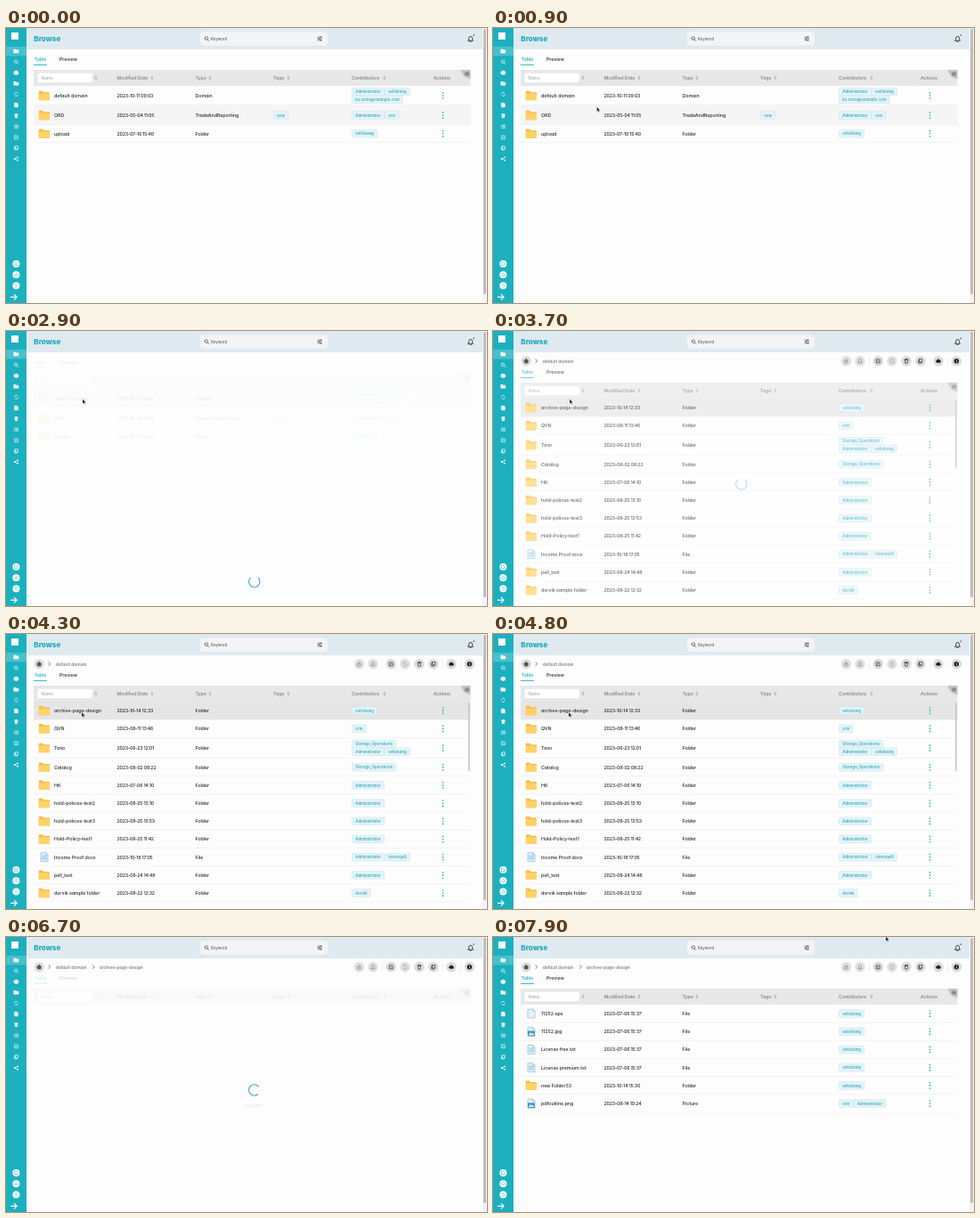
These frames come from a looping animation (540 by 309 pixels, 8 s). An HTML page:

```html
<!DOCTYPE html>
<html lang="en">
<head>
<meta charset="utf-8">
<title>Browse</title>
<style>
  html, body { margin: 0; width: 100%; height: 100%; overflow: hidden; background: #fdfdfd; }
  svg { display: block; width: 100%; height: 100%; }
  text {
    font-family: Inter, "Open Sans", sans-serif; font-feature-settings: "cv11";
    font-size: 5.3px; font-weight: 500; fill: #2b2b2b; letter-spacing: -.05px;
  }
  .date { letter-spacing: -.25px; }
  .head { font-weight: 600; fill: #8b8b8b; letter-spacing: -.1px; }
  .hint { font-size: 4.7px; fill: #aaa; }
  .chip { font-size: 4.4px; fill: #22a9ba; letter-spacing: 0; }
  .crumb { font-size: 4.9px; fill: #777; }
  .title { font-size: 8.2px; font-weight: 800; fill: #1cacbc; }
</style>
</head>
<body>
<svg id="stage" viewBox="0 0 540 309" preserveAspectRatio="none"></svg>
<script>
const LOOP = 8000, TEAL = '#1cb0bf', DARK = '#444';
const stage = document.getElementById('stage');

function add(parent, tag, attrs = {}, text) {
  const el = document.createElementNS('http://www.w3.org/2000/svg', tag);
  for (const k in attrs) el.setAttribute(k, attrs[k]);
  if (text) el.textContent = text;
  return parent.appendChild(el);
}
const group = (p, x = 0, y = 0) => add(p, 'g', { transform: `translate(${x} ${y})` });
const rect = (p, x, y, width, height, fill, more) => add(p, 'rect', { x, y, width, height, fill, ...more });
const circle = (p, cx, cy, r, fill, more) => add(p, 'circle', { cx, cy, r, fill, ...more });
const fillPath = (p, d, fill) => add(p, 'path', { d, fill });
const line = (p, d, stroke, w = .7) =>
  add(p, 'path', { d, stroke, 'stroke-width': w, fill: 'none', 'stroke-linecap': 'round', 'stroke-linejoin': 'round' });
// y is the middle of the line of text
const label = (p, x, y, text, cls = '') => add(p, 'text', { x, y: y + 1.9, class: cls }, text);
const show = (el, on) => el.setAttribute('visibility', on ? 'visible' : 'hidden');
const ramp = (t, a, b) => Math.min(1, Math.max(0, (t - a) / (b - a)));

// Small glyphs, centred on 0,0
const glyphs = {
  folder: 'M-2.5 -2H-.5L.2 -1.2H2.5V2H-2.5Z',
  search: 'M1.1 1.1L2.6 2.6M-2.2 -.4A1.8 1.8 0 1 1 1.4 -.4A1.8 1.8 0 1 1 -2.2 -.4',
  box: 'M-2.3 -1.2L0 -2.2L2.3 -1.2V1.6L0 2.3L-2.3 1.6Z',
  doc: 'M-1.8 -2.4H.8L1.9 -1.3V2.4H-1.8Z',
  bin: 'M-2 -1.6H2M-.7 -2.2H.7M-1.5 -1.2L-1.2 2.3H1.2L1.5 -1.2Z',
  list: 'M-2.3 -1.6H-2M-.9 -1.6H2.3M-2.3 0H-2M-.9 0H2.3M-2.3 1.6H-2M-.9 1.6H2.3',
  edit: 'M.6 -2H-2V2H2V-.4M-.5 .6L2.2 -2.1',
  loop: 'M-2 -.4A2 2 0 0 1 1.6 -1.4M2 .4A2 2 0 0 1 -1.6 1.4',
  share: 'M1.6 -1.7L-1.7 0L1.6 1.7',
  home: 'M-2.4 0L0 -2.2L2.4 0H1.7V2.2H-1.7V0Z',
  lock: 'M-1.6 -.2H1.6V2.2H-1.6ZM-1 -.2V-1.2A1 1 0 0 1 1 -1.2V-.2',
  bell: 'M-2.2 1.5H2.2L1.5 .5V-.6A1.5 1.6 0 0 0 -1.5 -.6V.5ZM-.5 2.3H.5',
  copy: 'M-1 -2.2H2V1.2H-1ZM-1 -1.2H-2V2.2H1V1.2',
  cloud: 'M-1.6 1.5A1.3 1.3 0 0 1 -1.5 -1A1.7 1.7 0 0 1 1.6 -.8A1.2 1.2 0 0 1 1.7 1.5Z'
};
function glyph(p, name, x, y, color, solid, size = 1) {
  const g = add(p, 'g', { transform: `translate(${x} ${y}) scale(${size})` });
  const el = line(g, glyphs[name], color, .7);
  if (solid) el.setAttribute('fill', color);
  return g;
}

function fileIcon(p, kind, y) {
  const g = group(p, 43, y);
  if (kind === 'd') {
    fillPath(g, 'M-6.2 -4.6Q-6.2 -5.3 -5.5 -5.3H-2L-.6 -3.8H5.3Q6 -3.8 6 -3.1V4.5Q6 5.2 5.3 5.2H-5.5Q-6.2 5.2 -6.2 4.5Z', '#f5bd48');
    rect(g, -6.2, -2.6, 12.2, 7.8, '#ffd265', { rx: .8 });
    return;
  }
  fillPath(g, 'M-4 -5H1.6L4 -2.6V5H-4Z', '#e5f1f8').setAttribute('stroke', '#79b4d3');
  g.firstChild.setAttribute('stroke-width', .6);
  line(g, 'M1.6 -5V-2.6H4', '#79b4d3', .5);
  if (kind === 't') line(g, 'M-2.3 -1.4H2.3M-2.3 .4H2.3M-2.3 2.2H2.3', '#5fa5ca', .6);
  if (kind === 'i') {
    rect(g, -4, -.8, 8, 5.8, '#4796bf');
    fillPath(g, 'M-3.2 4L-1 .8L.6 2.6L1.7 1.5L3.3 4Z', '#e5f1f8');
  }
}

function chips(p, x, y, names) {
  for (const name of names.split(',')) {
    const g = group(p, x, y);
    const box = rect(g, 0, -4.3, 1, 8.6, '#e6f3f7', { rx: 1.2, stroke: '#bfe2e9', 'stroke-width': .5 });
    const w = label(g, 3.8, -.3, name, 'chip').getComputedTextLength() + 7.6;
    box.setAttribute('width', w);
    x += w + .6;
  }
}

function sortMark(p, x, y) {
  fillPath(p, `M${x - 1.5} ${y - .6}h3l-1.5 -1.7zM${x - 1.5} ${y + .6}h3l-1.5 1.7z`, '#aaa');
}

// Tabs and column heads; top is the upper edge of the head bar
function tableHead(p, top) {
  const mid = top + 9, tab = top - 11.7;
  label(p, 31.5, tab, 'Table').style.fill = TEAL;
  label(p, 60, tab, 'Preview');
  rect(p, 31, tab + 5.6, 15, .9, TEAL);
  rect(p, 31, top, 490.5, 18, '#e7e7e8');
  rect(p, 35.5, top + 3.5, 61.5, 11, '#fff', { rx: 1, stroke: '#ddd', 'stroke-width': .4 });
  label(p, 39.5, mid, 'Name', 'hint');
  sortMark(p, 101, mid);
  [[124.5, 'Modified Date', 164], [212.5, 'Type', 229], [300, 'Tags', 317], [388, 'Contributors', 425], [480, 'Actions']]
    .forEach(([x, text, mark]) => {
      label(p, x, mid, text, 'head');
      if (mark) sortMark(p, mark, mid);
    });
  fillPath(p, `M510.5 ${top}H521.5V${top + 10.5}Q512.5 ${top + 9} 510.5 ${top}Z`, '#c4c4c4');
  glyph(p, 'list', 517.5, top + 4.6, DARK, false, .9);
}

// Row: icon|name|date|type|contributor lines split by /|tag
function makeRows(p, top, source, height) {
  const spans = [];
  const hover = rect(p, 31, 0, 490.5, 20, '#e5e5e6');
  source.forEach((row, i) => {
    const [kind, name, date, type, people, tag] = row.split('|');
    const h = height(i), y = top + h / 2, lines = people.split('/');
    fileIcon(p, kind, y);
    label(p, 54, y, name);
    label(p, 124.5, y, '2023-' + date, 'date');
    label(p, 212.5, y, type);
    if (tag) chips(p, 300.5, y, tag);
    lines.forEach((names, n) => chips(p, 388.5, y + (n - (lines.length - 1) / 2) * 8.7, names));
    [-3.1, 0, 3.1].forEach(d => circle(p, 490.5, y + d, .85, TEAL));
    rect(p, 31, top + h - .4, 490.5, .5, '#e9e9e9');
    spans.push([top, h]);
    top += h;
  });
  return { hover, spans };
}

const D = 'Administrator', S = 'veltokang', G = 'Storage_Operations';
const rootRows = [
  `d|default domain|10-11 09:03|Domain|${D},${S}/kv.zorin@example.com`,
  `d|ORD|05-04 11:05|TradeAndReporting|${D},orin|new`,
  `d|upload|07-10 15:40|Folder|${S}`
];
const domainRows = [
  `d|archive-page-design|10-14 12:33|Folder|${S}`,
  'd|QVN|08-11 13:46|Folder|orin',
  `d|Tavo|06-23 12:01|Folder|${G}/${D},${S}`,
  `d|Catalog|08-02 08:22|Folder|${G}`,
  `d|HK|07-06 14:10|Folder|${D}`,
  `d|hold-polices-test2|08-25 13:10|Folder|${D}`,
  `d|hold-polices-test3|08-25 13:53|Folder|${D}`,
  `d|Hold-Policy-test1|08-25 11:42|Folder|${D}`,
  `t|Income Proof.docx|10-18 17:05|File|${D},ravenquill`,
  `d|pell_test|08-24 14:48|Folder|${D}`,
  'd|dorvik sample folder|08-22 12:32|Folder|dorvik'
];
const folderRows = [
  `f|11252.eps|07-06 15:37|File|${S}`,
  `i|11252.jpg|07-06 15:37|File|${S}`,
  `t|License free.txt|07-06 15:37|File|${S}`,
  `t|License premium.txt|07-06 15:37|File|${S}`,
  `d|new Folder33|10-14 15:30|Folder|${S}`,
  `i|pdfoutline.png|08-14 10:24|Picture|orin,${D}`
];

rect(stage, 0, 0, 540, 309, '#fdfdfd');

// Table views
const rootView = group(stage);
tableHead(rootView, 47);
const root = makeRows(rootView, 65, rootRows, i => i < 2 ? 22 : 19.5);

const innerHead = group(stage);
tableHead(innerHead, 58);
const domainView = group(stage);
const domain = makeRows(domainView, 76, domainRows, i => i === 2 ? 23.2 : 20.2);
rect(domainView, 519, 77, 1.6, 77, '#c6c6c6', { rx: .8 });
const folderView = group(stage);
const folder = makeRows(folderView, 76, folderRows, () => 20.2);
show(folder.hover, false);
const empty = group(stage);
label(empty, 267, 189, 'No Data').style.fill = '#888';

const veil = rect(stage, 23, 24, 512, 285, '#fefefe');
const spinner = add(stage, 'g');
// three quarters of a ring, its gap facing right
line(spinner, 'M4.4 4.4A6.2 6.2 0 1 1 4.4 -4.4', '#45a9c4', 1.1);

// Path bar and tools
const bar = group(stage);
circle(bar, 37.3, 33.8, 5.6, '#dcdcdc');
glyph(bar, 'home', 37.3, 33.6, '#555', true, 1.05);
const chevron = (p, x) => line(p, `M${x} 31.8l1.7 1.8l-1.7 1.8`, '#555', .8);
chevron(bar, 48);
label(bar, 55.8, 33.6, 'default domain', 'crumb');
const deepCrumb = group(bar);
chevron(deepCrumb, 97.5);
label(deepCrumb, 105, 33.6, 'archive-page-design', 'crumb');
[[396.5, 'lock', 0], [412, 'bell', 0], [432.3, 'edit', 1], [448, 'loop', 0], [464, 'bin', 1], [479.8, 'copy', 1], [500, 'cloud', 2]]
  .forEach(([x, name, tone]) => {
    circle(bar, x, 33.8, 5.7, tone ? '#dadada' : '#e0e0e0');
    glyph(bar, name, x, 33.8, ['#8a8a8a', '#333', '#222'][tone], tone === 2);
  });
circle(bar, 520.3, 33.8, 5.7, '#dadada');
circle(bar, 520.3, 33.8, 2.7, '#222');
rect(bar, 520, 33.4, .7, 2, '#fff');
rect(bar, 520, 32.2, .7, .7, '#fff');
[422.3, 490, 510.2].forEach(x => rect(bar, x, 29, .4, 10, '#ddd'));

// Top bar
rect(stage, 23, 0, 512, 24, '#dfeaf0');
label(stage, 31.3, 12.8, 'Browse', 'title').setAttribute('y', 15);
rect(stage, 218, 4.3, 143, 15.4, '#f3f4f5', { rx: 4 });
glyph(stage, 'search', 225.3, 12, '#444');
label(stage, 230, 12, 'Keyword', 'hint').style.cssText = 'fill:#666;font-size:4.4px';
line(stage, 'M350 10.2H354.6M350 12H354.6M350 13.8H354.6', '#444', .6);
circle(stage, 353.2, 10.2, .7, '#444');
circle(stage, 351.3, 12, .7, '#444');
circle(stage, 353.2, 13.8, .7, '#444');
glyph(stage, 'bell', 521.6, 12.3, '#333', false, 1.3);
circle(stage, 525.2, 8.2, .9, '#a85c55');

// Side bar
rect(stage, 0, 0, 23, 309, TEAL);
rect(stage, 6, 5, 8, 8, '#fff');
rect(stage, 0, 21, 23, 10.3, '#49c0cc');
['folder', 'search', 'box', 'folder', 'loop', 'doc', 'bin', 'list', 'edit', 'copy', 'share'].forEach((name, i) => {
  glyph(stage, name, 11.5, 26 + i * 12.1, '#fff', ['folder', 'box', 'doc', 'bin'].includes(name), .95);
});
[[1.6, -1.7], [-1.7, 0], [1.6, 1.7]].forEach(([x, y]) => circle(stage, 11.5 + x, 147 + y, .9, '#fff'));
['doc', 'cloud', 'loop'].forEach((name, i) => {
  circle(stage, 11.4, 265 + i * 12.2, 4, '#fff');
  glyph(stage, name, 11.4, 265 + i * 12.2, TEAL, false, .8);
});
line(stage, 'M5.5 302.3H12M9.3 299.4L12.2 302.3L9.3 305.2', '#fff', 1.2);

// Page scroll bar
rect(stage, 535, 0, 5, 309, '#f3f3f3');
rect(stage, 536, 1, 3, 298, '#bdbdbd', { rx: 1 });

const pointer = add(stage, 'path', {
  d: 'M0 0V5.2L1.3 4L2.2 6L3 5.6L2.1 3.7H3.7Z', fill: '#111', stroke: '#fff', 'stroke-width': .3
});

// Pointer stops: time, x, y
const stops = [
  [0, 140, 98], [400, 140, 98], [1500, 86, 76.5], [3700, 86, 76.5], [4100, 85, 88],
  [5900, 85, 88], [6500, 85, -15], [6600, 441, -15], [7600, 441, -12], [7900, 441, -.5], [8000, 441, 1]
];
function pointerAt(t) {
  const i = stops.findIndex((s, n) => n && t <= s[0]);
  const [a, b] = [stops[i - 1], stops[i]];
  const u = ramp(t, a[0], b[0]), e = u * u * (3 - 2 * u);
  return [a[1] + (b[1] - a[1]) * e, a[2] + (b[2] - a[2]) * e];
}

function setHover(table, y, on, strength) {
  const span = on && table.spans.find(([top, h]) => y >= top && y < top + h);
  show(table.hover, !!span);
  if (!span) return;
  table.hover.setAttribute('y', span[0]);
  table.hover.setAttribute('height', span[1]);
  table.hover.setAttribute('opacity', strength);
}

function draw(t) {
  const inRoot = t < 3500, inDomain = !inRoot && t < 6500;
  const loadedFolder = t >= 6900;
  const [x, y] = pointerAt(t);

  show(rootView, inRoot);
  show(innerHead, !inRoot);
  show(domainView, inDomain);
  show(folderView, loadedFolder);
  show(empty, t >= 6500 && !loadedFolder);
  show(bar, !inRoot);
  show(deepCrumb, t >= 5500);

  setHover(root, y, inRoot, y > 87 ? .35 : 1);
  setHover(domain, y, inDomain, 1);

  const first = ramp(t, 2700, 2900) * (1 - ramp(t, 3500, 3800));
  const second = ramp(t, 5400, 5600) * (1 - .13 * ramp(t, 6500, 6700)) * (1 - ramp(t, 6900, 7100));
  const cover = t < 4500 ? first : second;
  veil.setAttribute('opacity', cover * .92);
  veil.setAttribute('y', inRoot ? 24 : 40.5);
  veil.setAttribute('height', inRoot ? 285 : 268.5);

  const turn = t < 4500 ? (t - 2900) * .45 - 90 : (t - 5600) * .45 - 130;
  spinner.setAttribute('opacity', Math.min(1, cover * 1.15));
  spinner.setAttribute('transform', `translate(278.8 ${inRoot ? 281.8 : 172}) rotate(${turn})`);

  show(pointer, t >= 400);
  pointer.setAttribute('transform', `translate(${x} ${y})`);
}

const start = performance.now();
function tick() {
  draw((performance.now() - start) % LOOP);
  requestAnimationFrame(tick);
}
tick();
</script>
</body>
</html>
```
